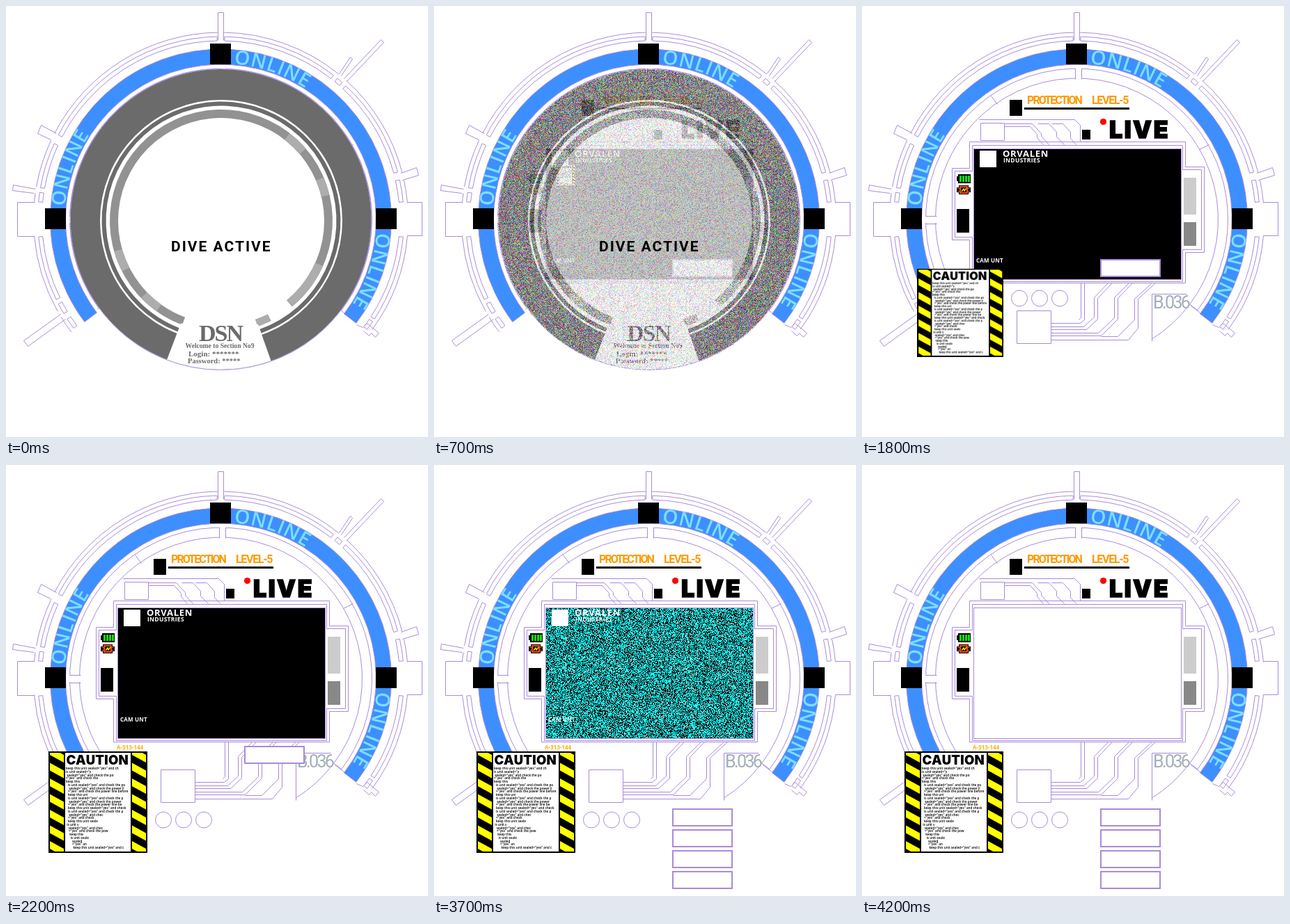
An HTML page with a canvas that plays this animation: 606 px wide and 620 px high, repeating every 4.6 s.

```html
<!DOCTYPE html>
<html lang="en">
<head>
<meta charset="utf-8">
<title>Dive console</title>
<style>
html, body { margin: 0; width: 606px; height: 620px; overflow: hidden; background: #fff; }
canvas { display: block; }
</style>
</head>
<body>
<canvas id="stage" width="606" height="620"></canvas>
<script>
const W = 606, H = 620, CX = 308.5, CY = 307, LOOP = 4600, STEP = 100;
const LINE = '#a98adb', GREY = '#6b6b6b';
const SANS = '"Open Sans", sans-serif', SERIF = '"Liberation Serif", serif';
const stage = document.getElementById('stage').getContext('2d');

const rad = deg => deg * Math.PI / 180;
const mix = (a, b, p) => a + (b - a) * p;
const clamp01 = v => Math.min(1, Math.max(0, v));

function randomizer(seed) {
  return () => (seed = (Math.imul(seed, 1664525) + 1013904223) >>> 0) / 2 ** 32;
}

function layer(paint, width = W, height = H) {
  const canvas = document.createElement('canvas');
  canvas.width = width;
  canvas.height = height;
  paint(canvas.getContext('2d', { willReadFrequently: true }));
  return canvas;
}

function box(c, color, x, y, w, h) {
  c.fillStyle = color;
  c.fillRect(x, y, w, h);
}

function text(c, str, x, y, font, color, spacing = 0) {
  c.font = font;
  c.fillStyle = color;
  c.letterSpacing = spacing + 'px';
  c.fillText(str, x, y);
  c.letterSpacing = '0px';
}

function band(c, inner, outer, from, to) {
  c.beginPath();
  c.arc(CX, CY, outer, rad(from), rad(to));
  c.arc(CX, CY, inner, rad(to), rad(from), true);
  c.closePath();
}

function fillBand(c, color, ...shape) {
  band(c, ...shape);
  c.fillStyle = color;
  c.fill();
}

function strokeArc(c, r, from, to) {
  c.beginPath();
  c.arc(CX, CY, r, rad(from), rad(to));
  c.stroke();
}

function strokePath(c, d) {
  c.save();
  c.translate(0.5, 0.5);
  c.stroke(new Path2D(d));
  c.restore();
}

// Letters set around the blue ring, starting at an angle measured from the top.
function ringText(c, str, start, sweep) {
  const r = 224.5;
  c.font = '600 28px ' + SANS;
  c.fillStyle = '#7adfff';
  c.textAlign = 'center';
  const widths = [...str].map(ch => c.measureText(ch).width);
  const gap = (rad(sweep) * r - widths.reduce((a, b) => a + b)) / (str.length - 1);
  let along = 0;
  widths.forEach((w, i) => {
    c.save();
    c.translate(CX, CY);
    c.rotate(rad(start) + (along + w / 2) / r);
    c.fillText(str[i], 0, -r);
    c.restore();
    along += w + gap;
  });
  c.textAlign = 'left';
}

const outerFrame = layer(c => {
  c.strokeStyle = LINE;
  for (const [a, b] of [[143, 148.5], [150.5, 175], [185, 188], [190, 205], [207.5, 269],
    [271, 309], [312, 345.5], [348, 355], [5, 36]]) strokeArc(c, 269, a, b);
  for (const [a, b] of [[143.5, 147], [149, 152.5], [154, 174.5], [185.5, 188.5], [190, 204.5],
    [207.5, 268.8], [271.2, 308], [309.5, 311.5], [313, 345], [347.5, 354.5], [5.5, 33], [34, 37]]) {
    band(c, 257, 263, a, b);
    c.stroke();
  }
  strokePath(c, 'M304 49V9H312V49 M478 97L494 73L497 76L481 100 M485 104L538 48L542 52L489 108'
    + ' M567 240L589 232L592 243L569 250 M576 282H597V330H576 M40 282H16V331H40');
  strokePath(c, 'M42 263L10 257L9 265L40 269 M72 183L50 171L45 183L64 192'
    + ' M78 443L25 481L31 489L85 450 M503 458L512 462L518 456L535 470L530 476L524 470L521 474L513 467');

  band(c, 223, 245, 143, 397.5);
  c.fillStyle = '#3d8fff';
  c.fill();
  c.stroke();
  box(c, '#000', 293, 54, 30, 30);
  box(c, '#000', 56, 291, 30, 30);
  box(c, '#000', 531, 291, 30, 30);
  for (const turn of [-90, 0, 90]) ringText(c, 'ONLINE', turn + 4.8, 28);
});

const innerFrame = layer(c => {
  c.strokeStyle = LINE;
  band(c, 203, 217, 144, 397);
  c.stroke();
  strokeArc(c, 203, 121, 144);
  strokeArc(c, 203, 37, 58);
  // Joints of the inner ring
  box(c, '#fff', 307, 88, 8, 18);
  box(c, '#fff', 90, 303, 19, 9);
  strokePath(c, 'M306 90V105 M315 90V105 M91 302H107 M91 313H107 M185 129L194 141 M484 206L498 199'
    + ' M202 480V412H160 M416 482V414H466 M131 436L143 425 M472 431L485 441');
  // Display housing
  strokePath(c, 'M154 195H464V231H491V354H464V398H154V336H129V233H154Z'
    + ' M158 200H460V235H487V350H460V396H158V332H133V237H158Z');
  // Upper traces
  strokePath(c, 'M168 163H305L313 171V195 M170 168H204V193H170Z'
    + ' M204 169H244L257 183V187L268 199 M204 173H241L251 184V189L260 199'
    + ' M252 169H268L279 181V188L290 199 M272 169H288L299 181V190L307 199');
  // Lower traces
  strokePath(c, 'M222 438H271V485H222Z M319 398V451L313 456H271 M314 398V448L311 451'
    + ' M353 398L333 419V447L318 461H271 M359 398L338 420V450L322 465H271');
  strokePath(c, 'M383 398L362 419V448L339 470H271 M388 398L367 420V450L343 474H271'
    + ' M416 398L391 421V451L367 475H343 M421 398L396 421V463L382 480H271');

  box(c, '#000', 212, 135, 18, 23);
  box(c, '#000', 233, 146, 151, 3);
  box(c, '#000', 316, 178, 12, 14);
  box(c, '#000', 136, 292, 18, 34);
  box(c, '#ccc', 462, 247, 18, 53);
  box(c, '#888', 462, 311, 18, 34);
  // Battery
  box(c, '#000', 138, 242, 18, 13);
  box(c, '#000', 136, 245, 2, 7);
  for (let x = 140; x < 155; x += 4) box(c, '#18e018', x, 244, 3, 9);
  // Power chip
  box(c, '#000', 136, 261, 20, 7);
  box(c, '#000', 139, 258, 14, 13);
  c.fillStyle = '#f04a20';
  c.fillRect(137, 262, 18, 1);
  c.fillRect(137, 266, 18, 1);
  c.fillRect(140, 259, 12, 11);
  box(c, '#000', 142, 261, 8, 7);
  c.strokeStyle = '#ffe000';
  c.lineWidth = 1.5;
  c.stroke(new Path2D('M143 267L146 263L147 266L150 262'));

  text(c, 'PROTECTION', 237, 141, 'bold 16px Roboto, sans-serif', '#ff9a00', -1.9);
  text(c, 'LEVEL-5', 330, 141, 'bold 16px Roboto, sans-serif', '#ff9a00', -1.3);
  text(c, 'LIVE', 355, 190, '900 34px Inter, sans-serif', '#000', 2.5);
  c.strokeStyle = '#000';
  c.letterSpacing = '2.5px';
  c.strokeText('LIVE', 355, 190);
  text(c, 'A-313-144', 159, 409, 'bold 8px ' + SANS, '#ffb000');
  text(c, 'B.036', 418, 435, '400 25px Roboto, sans-serif', '#a3afba', -2.6);
});

const panelText = layer(c => {
  box(c, '#fff', 169, 208, 24, 24);
  text(c, 'ORVALEN', 202, 217, 'bold 13px ' + SANS, '#fff', 0.7);
  text(c, 'INDUSTRIES', 203, 225, 'bold 8.5px ' + SANS, '#fff', 0.3);
  text(c, 'CAM UNT', 164, 369, 'bold 8px ' + SANS, '#fff', 0.2);
});

const caution = layer(c => {
  box(c, '#000', 0, 0, 142, 146);
  box(c, '#fff', 24, 2, 94, 142);
  c.fillStyle = '#ff0';
  for (const x of [2, 120]) {
    c.save();
    c.beginPath();
    c.rect(x, 2, 20, 142);
    c.clip();
    for (let y = -6; y < 146; y += 22.5) {
      c.beginPath();
      c.moveTo(x, y);
      c.lineTo(x + 20, y + 11);
      c.lineTo(x + 20, y + 22);
      c.lineTo(x, y + 11);
      c.fill();
    }
    c.restore();
  }
  text(c, 'CAUTION', 25.5, 19, '900 18.5px Inter, sans-serif', '#000', 0.3);
  const notice = 'keep this unit sealed="yes" and check the power line before opening>';
  const lengths = [34, 17, 30, 20, 10, 37, 36, 38, 13, 36, 33, 34, 38, 36, 22, 17, 20, 9, 22, 24, 9, 13, 7, 9, 33];
  lengths.forEach((n, i) => {
    const indent = i < 5 ? 0 : i < 17 ? 3 : (i - 16) * 1.3;
    const from = i * 7 % 28;
    text(c, notice.slice(from, from + n), 25 + indent, 26 + i * 4.75, '600 4.6px ' + SANS, '#000');
  });
}, 142, 146);

// The login disc; noise grows with each level.
function makeDisc(level) {
  return layer(c => {
    fillBand(c, GREY, 0, 216, 0, 360);
    // The inner rings sit slightly below the middle of the disc.
    c.save();
    c.translate(0.5, 2);
    fillBand(c, '#fff', 0, 174, 0, 360);
    fillBand(c, GREY, 165.5, 171.5, 111, 430.5);
    fillBand(c, '#929292', 148, 160, 110.5, 410.5);
    for (const [a, b] of [[125.5, 136], [153, 164], [308, 319.5], [337, 346.5], [24, 50.5]])
      fillBand(c, '#adadad', 148, 160, a, b);
    fillBand(c, '#adadad', 150, 161, 63.5, 71);
    c.restore();
    fillBand(c, '#fff', 160, 216, 70.5, 111);
    c.strokeStyle = LINE;
    strokeArc(c, 216.5, 0, 360);
    c.textAlign = 'center';
    text(c, 'DSN', 308, 482, 'bold 34px ' + SERIF, GREY, -2);
    text(c, 'Welcome to Section No9', 307, 492, 'bold 9.6px ' + SERIF, GREY);
    c.textAlign = 'left';
    text(c, 'Login: *******', 262, 504, 'bold 11px ' + SERIF, GREY);
    text(c, 'Password: *****', 261, 514, 'bold 10.5px ' + SERIF, GREY);
    if (!level) return;
    const image = c.getImageData(0, 0, W, H), data = image.data, random = randomizer(level);
    for (let i = 0; i < data.length; i++)
      if (i % 4 < 3) data[i] += (random() - 0.5) * 75 * level;
    c.putImageData(image, 0, 0);
  });
}

// Display static that dissolves into white.
function makeStatic(level) {
  const random = randomizer(level + 50);
  return layer(c => {
    const image = c.createImageData(299, 189);
    for (let i = 0; i < image.data.length; i += 4) {
      const pick = random();
      const color = random() < level / 5 ? [255, 255, 255]
        : pick < 0.46 ? [0, 250, 250] : pick < 0.88 ? [0, 0, 0] : [190, 190, 190];
      image.data.set([...color, 255], i);
    }
    c.putImageData(image, 0, 0);
  }, 299, 189);
}

const discs = [0, 1, 2, 3].map(makeDisc);
const statics = [0, 1, 2, 3, 4, 5].map(makeStatic);

function drawPanel(c, t) {
  if (t < 3700) box(c, '#000', 160, 205, 299, 189);
  else c.drawImage(statics[Math.min(5, (t - 3700) / STEP)], 160, 205);
  c.strokeStyle = LINE;
  c.lineWidth = 1;
  c.strokeRect(160.5, 205.5, 298, 188);
  c.drawImage(panelText, 0, 0);
}

function drawCircles(c, t) {
  const y = mix(420.5, 510.5, clamp01((t - 1900) / 300));
  for (const x of [226, 255, 284]) {
    c.beginPath();
    c.arc(x, y, 11.5, 0, 7);
    c.stroke();
  }
}

function drawTags(c, t) {
  const top = mix(365, 495, clamp01((t - 1800) / 1300));
  const extra = Math.max(0, Math.min(3, (t - 3100) / STEP));
  c.lineWidth = 2;
  for (let i = 0; i <= extra; i++) {
    box(c, '#fff', 343, top + i * 30, 85, 24);
    c.strokeRect(343, top + i * 30, 85, 24);
  }
}

function drawCaution(c, t) {
  const p = clamp01((t - 1400) / 500);
  const size = t < 1400 ? 0.2 : mix(0.35, 1, p);
  const top = t < 1400 ? 229 : mix(240, 412, p);
  c.drawImage(caution, 203 - 142 * size, top, 142 * size, 146 * size);
}

function draw(t) {
  const c = stage;
  box(c, '#fff', 0, 0, W, H);
  c.drawImage(outerFrame, 0, 0);
  c.drawImage(innerFrame, 0, 0);
  drawPanel(c, t);
  drawCircles(c, t);
  drawTags(c, t);
  drawCaution(c, t);
  if (t >= 1400) {
    c.fillStyle = '#f00';
    c.beginPath();
    c.arc(346.5, 166.5, 4.6, 0, 7);
    c.fill();
  }
  if (t < 800) {
    const level = Math.max(0, (t - 400) / STEP);
    c.globalAlpha = 1 - level * 0.06;
    c.drawImage(discs[level], 0, 0);
    c.globalAlpha = 1;
    text(c, 'DIVE ACTIVE', 237, 353, 'bold 21px Roboto, sans-serif', '#000', 2);
  }
}

function tick() {
  draw(Math.floor(performance.now() % LOOP / STEP) * STEP);
  requestAnimationFrame(tick);
}
tick();
</script>
</body>
</html>
```
